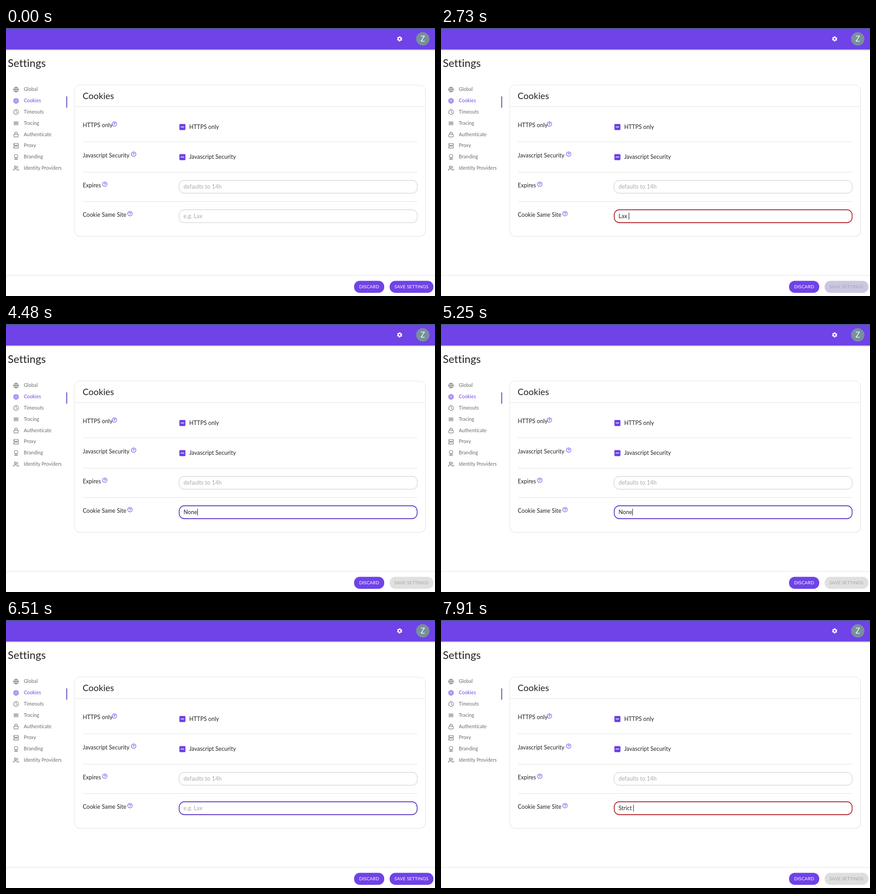
Recreate the animation shown at these times as an HTML page. Size 946 by 592 pixels, loop 8 s.

```html
<!DOCTYPE html>
<html lang="en">
<head>
<meta charset="utf-8">
<title>Cookie settings</title>
<style>
  html, body { margin: 0; width: 100%; height: 100%; overflow: hidden; background: #fff; }
  svg { display: block; }
  text { font: 12.4px Lato, sans-serif; letter-spacing: .1px; fill: #222; white-space: pre; }
  .page { font-size: 23.5px; }
  .heading { font-size: 19.6px; }
  .hint { fill: #a9a9a9; }
  .nav text { font-size: 10.6px; fill: #6a6a6a; }
  .nav g { fill: none; stroke: #666; stroke-width: 2; stroke-linecap: round; stroke-linejoin: round; }
  .nav .active text { fill: #6f43e7; }
  .nav .active g { stroke: #6f43e7; }
  .button { font-size: 10.1px; fill: #fff; text-anchor: middle; }
  .help { fill: none; stroke: #6f43e7; stroke-width: 1.1; stroke-linecap: round; }
  .rule { stroke: #e2e2e2; }
  .field { fill: #fff; stroke: #c6c6c6; }
</style>
</head>
<body>
<svg width="946" height="592" viewBox="0 0 946 592">
  <defs>
    <linearGradient id="shade" x2="0" y2="1">
      <stop stop-color="#000" stop-opacity=".22"/>
      <stop offset="1" stop-color="#000" stop-opacity="0"/>
    </linearGradient>
  </defs>

  <rect y="47" width="946" height="4" fill="url(#shade)"/>
  <rect width="946" height="47.5" fill="#6f43e7"/>
  <rect width="946" height="1.4" fill="#35655f"/>
  <g fill="none" stroke="#fff">
    <circle cx="868" cy="24" r="3.3" stroke-width="2.6"/>
    <circle cx="868" cy="24" r="4.9" stroke-width="2" stroke-dasharray="2.4 2.731" stroke-dashoffset="-1.365"/>
  </g>
  <circle cx="919" cy="24" r="14.7" fill="#78909c"/>
  <text x="919" y="30" text-anchor="middle" style="font-size:16.5px;fill:#fff">Z</text>

  <text class="page" x="4" y="86">Settings</text>
  <g id="nav" class="nav"></g>
  <rect x="133" y="151" width="1.8" height="25" fill="#5e3bc8"/>

  <rect x="151.5" y="127" width="774" height="334" rx="12" fill="none" stroke="#f0f0f0"/>
  <rect x="151.5" y="126" width="773.5" height="334" rx="12" fill="#fff" stroke="#e4e4e4"/>
  <text class="heading" x="169" y="157">Cookies</text>
  <path class="rule" d="M152 173.5H925M169.5 251.5H907M169.5 318.5H907M169.5 383.5H907M0 546.5H946"/>
  <g id="rows"></g>

  <rect class="field" x="381.5" y="336.5" width="525.5" height="28.5" rx="11.5"/>
  <text class="hint" x="391.5" y="355">defaults to 14h</text>
  <rect class="field" id="field" rx="11.5"/>
  <text id="value" x="391.5" y="420"></text>
  <rect id="caret" y="408" width="1" height="15" fill="#111"/>

  <rect x="767.5" y="558.5" width="66.5" height="26.5" rx="12.5" fill="#6f43e7"/>
  <text class="button" x="800.8" y="575.3">DISCARD</text>
  <rect id="save" x="846" y="558.5" width="96.5" height="26.5" rx="12.5"/>
  <text class="button" id="saveLabel" x="894" y="575.3">SAVE SETTINGS</text>
</svg>

<script>
const byId = id => document.getElementById(id);
const circle = (x, y, r) => `<circle cx="${x}" cy="${y}" r="${r}"/>`;
const box = (x, y, w, h, r) => `<rect x="${x}" y="${y}" width="${w}" height="${h}" rx="${r}"/>`;
const path = d => `<path d="${d}"/>`;

// Navigation icons on a 24 unit grid
const navItems = [
  ['Global', circle(12, 12, 10) + path('M2 12H22M12 2a15.3 15.3 0 0 1 0 20a15.3 15.3 0 0 1 0-20')],
  ['Cookies', circle(12, 12, 10) +
    path('M14.3 8l5.7 9.9M9.7 8h11.5M7.4 12l5.7-9.9M9.7 16L4 6.1M14.3 16H2.8M16.6 12l-5.7 9.9')],
  ['Timeouts', circle(12, 12, 10) + path('M12 6v6l4 2')],
  ['Tracing', path('M3 6H21M3 10H21M3 14H21M3 18H21')],
  ['Authenticate', box(3, 11, 18, 11, 2) + path('M7 11V7a5 5 0 0 1 10 0v4')],
  ['Proxy', box(2, 2, 20, 8, 2) + box(2, 14, 20, 8, 2) + path('M6 6h.1M6 18h.1')],
  ['Branding', circle(12, 8, 7) + path('M8.2 13.9L7 23l5-3 5 3-1.2-9.1')],
  ['Identity Providers', circle(9, 7, 4) +
    path('M17 21v-2a4 4 0 0 0-4-4H5a4 4 0 0 0-4 4v2M23 21v-2a4 4 0 0 0-3-3.9M16 3.1a4 4 0 0 1 0 7.8')],
];
byId('nav').innerHTML = navItems.map(([label, icon], i) => {
  const y = 135.6 + i * 24.85;
  return `<g class="${label === 'Cookies' ? 'active' : ''}" style="stroke:none">
    <g transform="translate(15.8 ${y - 6}) scale(.53)">${icon}</g>
    <text x="39.3" y="${y + 3.6}">${label}</text></g>`;
}).join('');

// Setting label, baseline, help icon position, has checkbox
const rows = [
  ['HTTPS only', 219, 239, true],
  ['Javascript Security', 285.5, 281.5, true],
  ['Expires', 352, 217.8],
  ['Cookie Same Site', 417, 273.4],
];
byId('rows').innerHTML = rows.map(([label, y, helpX, checkbox]) => `
  <text x="169.3" y="${y}">${label}</text>
  <g class="help" transform="translate(${helpX} ${y - 7})">${circle(0, 0, 5)}
    ${path('M-1.5 -1.2a1.5 1.5 0 1 1 2.2 1.3q-.7 .4 -.7 1M0 2.7v.1')}</g>` +
  (checkbox ? `
  <g fill="#6f43e7">${box(382.3, y - 7, 13.4, 13.4, 1.8)}</g>
  <path d="M385.3 ${y - .4}h7.4" stroke="#fff" stroke-width="1.5"/>
  <text x="404" y="${y + 3.5}">${label}</text>` : '')).join('');

const LOOP = 8000, TICK = 70, FOCUS = 350, FADE = 250;
const allowed = ['', 'Lax', 'None', 'Strict'];
const edits = [
  [0, ''], [1820, 'L'], [2030, 'La'], [2240, 'Lax'], [2590, 'Lax '],
  [2940, 'Lax'], [3150, 'La'], [3360, 'L'], [3500, ''],
  [4085, 'N'], [4200, 'No'], [4270, 'Non'], [4480, 'None'], [4855, 'None '],
  [5250, 'None'], [5670, 'Non'], [5810, 'No'], [5950, 'N'], [6160, ''],
  [6535, 'S'], [6720, 'St'], [6860, 'Str'], [7000, 'Stri'], [7140, 'Stric'],
  [7350, 'Strict'], [7700, 'Strict '],
];
const caretOff = [[0, FOCUS], [840, 1400], [6510, 6535]];

// cubic-bezier(.4, 0, .2, 1)
function ease(x) {
  if (x >= 1) return 1;
  let low = 0, high = 1, s;
  for (let i = 0; i < 20; i++) {
    s = (low + high) / 2;
    const at = 1.2 * s * (1 - s) ** 2 + .6 * s * s * (1 - s) + s ** 3;
    if (at < x) low = s; else high = s;
  }
  return s * s * (3 - 2 * s);
}

function stateAt(t) {
  let text = '', valid = true, since = -FADE;
  for (const [time, value] of edits) {
    if (time > t) break;
    text = value;
    if (allowed.includes(text) !== valid) {
      valid = !valid;
      since = time;
    }
  }
  const progress = ease((t - since) / FADE);
  return { text, valid, enabled: valid ? progress : 1 - progress };
}

function draw(t) {
  const { text, valid, enabled } = stateAt(t);
  const focused = t >= FOCUS;
  const field = byId('field'), value = byId('value'), caret = byId('caret');

  const inset = focused ? .4 : 0;
  field.setAttribute('x', 381.5 + inset);
  field.setAttribute('y', 401.5);
  field.setAttribute('width', 525.5 - 2 * inset);
  field.setAttribute('height', 28.5);
  field.style.stroke = !focused ? '' : valid ? '#5e3bc8' : '#b02a2e';
  field.style.strokeWidth = focused ? 1.8 : 1;

  value.textContent = text || 'e.g. Lax';
  value.classList.toggle('hint', !text);
  const width = text ? value.getComputedTextLength() : 0;
  caret.setAttribute('x', Math.round(391.8 + width));
  caret.style.display = caretOff.some(([from, to]) => t >= from && t < to) ? 'none' : '';

  const share = enabled * 100 + '%';
  byId('save').style.fill = `color-mix(in srgb, #6f43e7 ${share}, rgba(0, 0, 0, .12))`;
  byId('saveLabel').style.fill = `color-mix(in srgb, #fff ${share}, rgba(0, 0, 0, .26))`;
}

function frame() {
  const t = performance.now() % LOOP;
  draw(Math.min(Math.floor(t / TICK) * TICK, 7910));
  requestAnimationFrame(frame);
}
frame();
</script>
</body>
</html>
```
